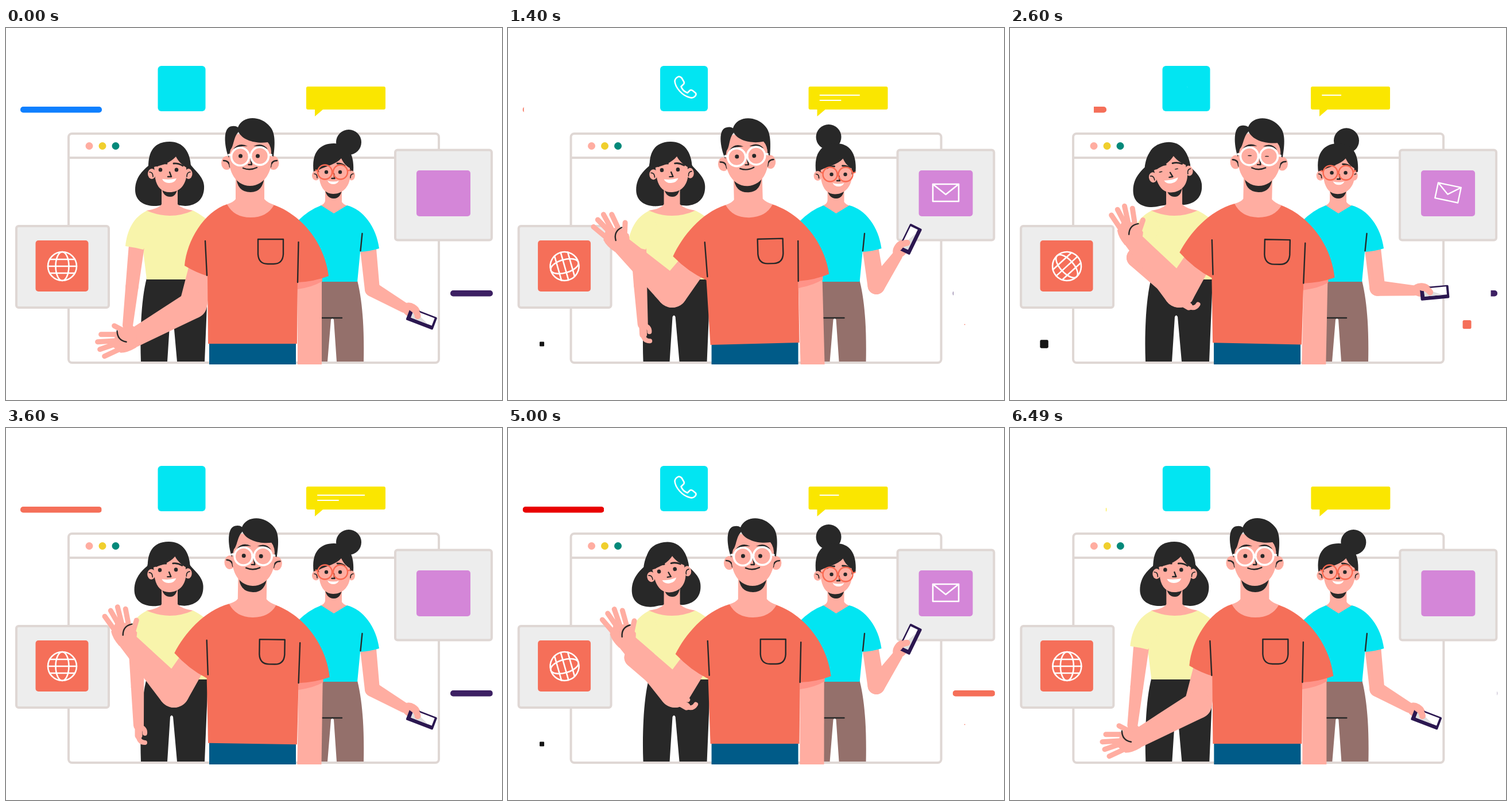
Write an HTML page that moves like this. It is 864 px wide and 648 px high and loops after 6690 ms.

```html
<!DOCTYPE html>
<html lang="en">
<head>
<meta charset="utf-8">
<title>Team greeting</title>
<style>
html, body { margin: 0; width: 100%; height: 100%; overflow: hidden; background: #fff; }
svg { display: block; width: 100vw; height: 100vh; }
.skin { fill: #ffada1; }
.dark { fill: #282828; }
.coral { fill: #f56f59; }
.cyan { fill: #02e5f2; }
.lemon { fill: #f8f4ab; }
.brown { fill: #94706b; }
.frame { stroke: #dfd7d4; stroke-width: 4; }
.ink, .white, .finger { fill: none; stroke-linecap: round; stroke-linejoin: round; }
.ink { stroke: #282828; stroke-width: 2.4; }
.fine { stroke-width: 1.7; }
.brow { stroke-width: 2.8; }
.white { stroke: #fff; stroke-width: 2.6; }
.finger { stroke: #ffada1; stroke-width: 9; }
</style>
</head>
<body>
<svg viewBox="0 0 864 648" preserveAspectRatio="xMidYMid meet">
<defs>
  <clipPath id="floor"><rect width="864" height="586"/></clipPath>
  <clipPath id="wipeL"><rect id="wipeLBox" y="130" height="24"/></clipPath>
  <clipPath id="wipeR"><rect id="wipeRBox" y="450" height="24"/></clipPath>
</defs>
<g id="scene">
  <!-- browser window and floating cards -->
  <rect class="frame" x="109" y="184" width="645" height="399" rx="6" fill="#fff"/>
  <path class="frame" d="M109 226H754"/>
  <circle cx="145" cy="205.5" r="6.5" fill="#ffada1"/>
  <circle cx="168" cy="205.5" r="6.5" fill="#f0cf2d"/>
  <circle cx="191" cy="205.5" r="6.5" fill="#02897a"/>

  <rect class="frame" x="18" y="345" width="161" height="142" rx="4" fill="#ededed"/>
  <rect class="coral" x="51.5" y="370" width="92" height="89" rx="5"/>
  <g id="globe" class="white">
    <circle r="25"/><ellipse rx="11.5" ry="25"/>
    <path d="M-25 0H25M-22-12H22M-22 12H22"/>
  </g>

  <rect class="frame" x="678" y="212.5" width="168" height="157" rx="4" fill="#ededed"/>
  <rect x="715" y="248" width="94" height="80" rx="5" fill="#d486d8"/>
  <path id="mail" class="white" d="M-22.5-15H22.5V15H-22.5ZM-22.5-15L0 3L22.5-15"/>

  <rect class="cyan" x="264.5" y="66" width="83" height="79" rx="6"/>
  <path id="call" class="white" d="M-14-17Q-10-20-6-16L-2-9Q-1-6-4-4L-7-1C-5 5-1 8 4 10L8 6Q10 4 13 6L18 10Q20 12 18 15Q14 20 8 18C-5 15-17 1-18-10Q-18-14-14-17Z"/>

  <path fill="#fae600" d="M526 102H658Q661 102 661 105V139Q661 142 658 142H552L538 154V142H526Q523 142 523 139V105Q523 102 526 102Z"/>
  <path id="line1" class="white" style="stroke-width:2"/>
  <path id="line2" class="white" style="stroke-width:2"/>

  <g clip-path="url(#wipeL)"><rect id="barL" x="25" y="137" width="142" height="10.5" rx="5"/></g>
  <g clip-path="url(#wipeR)"><rect id="barR" x="774" y="457" width="74" height="10.5" rx="5"/></g>
  <rect id="boxL" fill="#141414"/>
  <rect id="boxR" class="coral"/>

  <!-- woman on the right -->
  <circle id="bun" class="dark" r="22"/>
  <path class="skin" d="M556 278H585V303Q588 308 596 310L571 325L547 310Q556 306 556 300Z"/>
  <path class="dark" d="M555 277Q557 297 571 297Q584 297 586 277Z"/>
  <path class="dark" d="M536 252C531 215 548 201 571 201C593 201 607 216 605 250L599 255H546Z"/>
  <g id="headR">
    <ellipse class="skin" cx="540" cy="257" rx="7" ry="8.5"/>
    <path class="ink fine" d="M537 254Q542 254 542 261"/>
    <g id="earR">
      <ellipse class="skin" cx="602" cy="257" rx="6" ry="8.5"/>
      <path class="ink fine" d="M605 254Q600 254 600 261"/>
    </g>
    <path class="skin" d="M545 247L546 264C549 281 558 289 570 289C585 289 597 278 599 262V244C592 240 587 234 584 227C574 238 559 240 545 247Z"/>
    <g id="faceR">
      <path class="ink brow" d="M550 240Q556 236 563 237M577 236Q585 236 590 240"/>
      <circle class="dark" cx="558" cy="251" r="3.2"/><circle class="dark" cx="582" cy="251" r="3.2"/>
      <path class="ink" d="M571 254L572.5 262H567.5"/>
      <path fill="#fff" d="M560 266Q571 269 580 266Q577 272 570 272Q563 272 560 266Z"/>
      <path fill="none" stroke="#fa6a52" stroke-width="2.4" d="M543 251a12.5 12.5 0 1 0 25 0a12.5 12.5 0 1 0-25 0M570 251a12.5 12.5 0 1 0 25 0a12.5 12.5 0 1 0-25 0M568 249H570M595 249L600 247M543 249L539 247"/>
    </g>
  </g>
  <path class="brown" d="M530 440H612C622 480 624 530 623 581H576L571 508Q568.5 503 566 508L560 581H530Z"/>
  <path class="ink" d="M540 505H585"/>
  <path id="upperR" class="skin"/><path id="foreR" class="skin"/>
  <g id="handR">
    <ellipse class="skin" cx="13" cy="-2" rx="17" ry="12"/>
    <g transform="translate(36 1.5) rotate(-9)">
      <rect x="-25" y="-11.5" width="50" height="23" rx="2" fill="#2b1750"/>
      <path fill="#fff" d="M-18-9H21V5H-18Z"/><path fill="#dedede" d="M-18-9L14 5H-18Z"/>
    </g>
    <path class="finger" style="stroke-width:11" d="M13-6Q23-6 28 1"/>
  </g>
  <path class="cyan" d="M549 309L571 323L594 309C622 316 645 346 650 384Q634 389 617 390L612 442H500V345Q522 319 549 309Z"/>
  <path class="ink" d="M620.5 358L617.5 388"/>

  <!-- woman on the left -->
  <path id="hairL" class="dark" d="M285 205C258 205 252 222 248 240C236 250 225 262 225 282C225 302 242 311 262 310Q285 306 312 310C335 309 346 295 345 275C344 258 327 247 321 237C318 216 306 205 285 205Z"/>
  <path class="skin" d="M271 276H299V307Q306 315 326 318Q285 340 244 318Q266 315 271 307Z"/>
  <path class="dark" d="M271 277Q273 294 286 294Q297 294 299 277Z"/>
  <g id="headL">
    <path class="dark" d="M285 198C258 198 247 215 248 245L259 262H314L322 245C322 215 308 198 285 198Z"/>
    <ellipse class="skin" cx="254" cy="254" rx="7" ry="9"/><ellipse class="skin" cx="318" cy="254" rx="6.5" ry="9"/>
    <path class="ink fine" d="M250 251Q256 251 256 259M321 251Q315 251 315 259"/>
    <path class="skin" d="M258 242L260 262C263 278 272 286 285 286C301 286 311 276 314 260V243C307 239 300 232 296 224C286 235 272 239 258 242Z"/>
    <path class="ink brow" d="M263 240Q271 235 280 236M292 236Q300 235 308 240"/>
    <ellipse class="dark eyeL" cx="269" cy="247" rx="3.3"/><ellipse class="dark eyeL" cx="297" cy="247" rx="3.3"/>
    <path class="ink" d="M285 251L288 259H282"/>
    <path fill="#fff" d="M272 263Q285 265 297 262Q294 270 284 270Q275 270 272 263Z"/>
  </g>
  <path class="dark" d="M245 436H352L346 581H298L291 503Q288.5 498 286 503L281 581H235C233 530 236 470 245 436Z"/>
  <path class="lemon" d="M245 318Q285 336 326 318Q346 328 362 345V438H245L238 380Z"/>
  <path id="upperL" class="skin"/><path id="foreL" class="skin"/>
  <g id="handL">
    <path class="finger" style="stroke-width:13" d="M0-2V18"/>
    <path class="finger" style="stroke-width:8" d="M-1 18Q1 30 11 30M3 2Q12 6 11 14"/>
  </g>
  <path class="lemon" d="M246 318C222 329 211 352 208 380Q223 382 239 386L262 350Z"/>

  <!-- man in front -->
  <g clip-path="url(#floor)">
    <path id="upperM" class="skin"/><path id="foreM" class="skin"/>
    <g id="handM">
      <path class="skin" d="M-29-11L-10-20Q8-16 8-4L7 15Q-8 24-20 24L-33 14Z"/>
      <path class="finger" d="M-31-23L-12-13M-54-8L-26-8M-60 5L-28 3M-56 18L-24 7M-48 30L-18 16"/>
      <path class="ink" d="M-26-14Q-26 2-10 5"/>
    </g>
    <path fill="#005b88" d="M354 546H505V586H354Z"/>
    <g id="man">
      <path class="skin" d="M508 430H550V605H508Z"/>
      <path fill="#ff9388" d="M508 440L551 432V441Q535 451 508 455Z"/>
      <path id="shirt" class="coral"/>
      <path class="skin" d="M400 262H450V298Q455 304 467 308Q455 330 426 330Q397 330 385 307Q397 303 400 298Z"/>
      <path class="ink" d="M439 368H483V394Q482 411 466 411H456Q440 411 439 394ZM347 371L350 431M509.5 373L508 443"/>
      <g id="headM">
        <path class="dark" d="M401 258Q402 286 426 286Q448 286 450 258Z"/>
        <ellipse class="skin" cx="384.5" cy="235" rx="9.5" ry="12"/><ellipse class="skin" cx="466" cy="235" rx="9.5" ry="12"/>
        <path class="ink" d="M379 231Q389 231 390 242M472 231Q462 231 461 242"/>
        <path class="skin" d="M389 185V236C392 262 408 275 425 275C442 275 459 262 462 236V185Z"/>
        <path class="dark" d="M388 226C380 205 377 172 394 171Q400 170 404 173C412 152 444 152 460 172C469 182 469 200 466 224L462 222Q463 207 456 199C436 202 412 196 405 181C396 190 397 206 391 212Z"/>
        <path class="dark" d="M396 211Q406 198 421 206Q408 205 396 211ZM431 206Q446 198 456 211Q445 205 431 206Z"/>
        <ellipse class="dark eyeM" cx="408.5" cy="223" rx="3.5"/><ellipse class="dark eyeM" cx="438.5" cy="223" rx="3.5"/>
        <path class="ink" d="M426 226L428 238H422.5M413 244Q425 249 437 243"/>
        <path class="white" style="stroke-width:3.6" d="M392.5 224a15.5 15.5 0 1 0 31 0a15.5 15.5 0 1 0-31 0M426.5 223a15.5 15.5 0 1 0 31 0a15.5 15.5 0 1 0-31 0M423 222H427M392 221H388M458 221H462"/>
      </g>
    </g>
  </g>
</g>
</svg>
<script>
const LOOP = 6690, CYCLE = 18, RAD = Math.PI / 180;
const $ = id => document.getElementById(id);
const set = (id, attrs) => { for (const k in attrs) $(id).setAttribute(k, attrs[k]); };
const move = (id, value) => set(id, { transform: value });
const mix = (a, b, k) => a + (b - a) * k;
const mixPt = (a, b, k) => a.map((v, i) => mix(v, b[i], k));

const clamp = k => Math.min(1, Math.max(0, k));
const easeOut = k => 1 - (1 - clamp(k)) ** 2;
// Smooth rise from 0 to 1 between a and b.
const ramp = (t, a, b) => (1 - Math.cos(Math.PI * clamp((t - a) / (b - a)))) / 2;
// Rise between a and b, fall between c and d.
const pulse = (t, a, b, c, d) => ramp(t, a, b) - ramp(t, c, d);

// Outline around two circles given as [x, y, r].
function limb(id, a, b) {
  const th = Math.atan2(b[1] - a[1], b[0] - a[0]);
  const k = Math.acos((a[2] - b[2]) / Math.hypot(b[0] - a[0], b[1] - a[1]));
  const at = (c, ang) => `${c[0] + c[2] * Math.cos(ang)} ${c[1] + c[2] * Math.sin(ang)}`;
  const arc = (c, big, ang) => `A${c[2]} ${c[2]} 0 ${big ? 1 : 0} 0 ${at(c, ang)}`;
  set(id, { d: `M${at(a, th + k)}L${at(b, th + k)}${arc(b, a[2] < b[2], th - k)}L${at(a, th - k)}${arc(a, a[2] > b[2], th + k)}Z` });
}

// Draws upper arm and forearm, then puts the hand on the wrist.
function arm(side, shoulder, elbow, wrist, turn) {
  limb('upper' + side, shoulder, elbow);
  limb('fore' + side, elbow, wrist);
  move('hand' + side, `translate(${wrist[0]} ${wrist[1]}) rotate(${turn})`);
}

const reach = (p, deg, len, r) => [p[0] + len * Math.cos(deg * RAD), p[1] + len * Math.sin(deg * RAD), r];

function blink(name, shut) {
  document.querySelectorAll('.' + name).forEach(e => e.setAttribute('ry', shut ? 0.8 : 3.5));
}

function square(id, x, y, size) {
  set(id, { x: x - size / 2, y: y - size / 2, width: size, height: size, rx: size / 6 });
}

const CORAL = '#f56f59', PLUM = '#3d2063';
const COLORS_L = ['#0f80ff', CORAL, CORAL, '#e90000', '#fae600'];

// Every seven steps a bar wipes in and out again; the first one is already in.
function drawBars(n) {
  const turn = Math.min(4, Math.floor(n / 7)), p = n - turn * 7;
  const head = turn ? easeOut((p + 0.03) / 4.3) : 1;
  const tail = easeOut((p - 4) / 3.3);
  const wipe = (id, x, w) => set(id, { x: x + w * tail, width: w * Math.max(0, head - tail) });
  wipe('wipeLBox', 25, 142);
  wipe('wipeRBox', 774, 74);
  set('barL', { fill: COLORS_L[turn] });
  set('barR', { fill: turn === 3 ? CORAL : PLUM });
}

function drawIcons(n, p) {
  move('globe', `translate(98 415) rotate(${180 * p / (CYCLE - 1)})`);
  move('mail', `translate(762 287) rotate(${12 * Math.max(0, p - 12)}) scale(${pulse(p, 2, 5, 12, 17)})`);
  move('call', `translate(308 103) scale(${pulse(p, 2, 5, 9, 13.5)})`);

  const q = n % 12;
  const line = (id, y, len) => set(id, { d: len > 1 ? `M543 ${y}h${len - 1}` : '' });
  line('line1', 117, 84 * (easeOut(q / 4.5) - ramp(q, 5.5, 11)));
  line('line2', 126, 37 * pulse(q, 2, 5, 8, 11));

  square('boxL', 58.5, 550.5, 16 * pulse(p, 3, 11, 12, 17));
  square('boxR', 795, 516.5, 15 * pulse(p, 5.5, 13, 14, 17));
}

function drawRight(p) {
  const q = pulse(p, 0, 7, 7, 16.6);
  set('bun', { cx: mix(597, 558, q), cy: mix(199, 190, q) });
  move('headR', `translate(${-q} ${q * 0.5})`);
  move('earR', `translate(${-10 * q} 0)`);
  move('faceR', `translate(${6 * q} ${3.5 * q})`);
  const elbow = mixPt([638, 455, 13], [641, 449, 15], q);
  const angle = mix(30, -55, q);
  arm('R', [631, 385, 14], elbow, reach(elbow, angle, 64, 9), angle);
}

function drawLeft(n) {
  const tilt = pulse(n, 4.5, 13, 13, 19.5) + pulse(n, 19, 27, 30, 35);
  move('hairL', `translate(${-11 * tilt} 0) rotate(${-4 * tilt} 285 290)`);
  move('headL', `rotate(${-10.5 * tilt} 285 290)`);
  blink('eyeL', n % 26 === 13);

  const hip = pulse(n, 6, 13, 13, 18) + pulse(n, 20, 25, 30, 35);
  const shoulder = [227, 384, 13.5];
  const hanging = [mix(212, 231, pulse(n, 0, 6, 30, 35)), 518, 9];
  const wrist = mixPt(hanging, [295, 476, 9], hip);
  const elbow = mixPt(mixPt(shoulder, wrist, 0.5), [219, 400, 17], hip);
  arm('L', shoulder, elbow, wrist, -60 * hip);
}

function drawMan(n) {
  const lean = 1.2 * pulse(n, 7, 13, 13, 27) - 1.55 * pulse(n, 0, 7, 7, 13);
  move('man', `rotate(${lean} 430 550)`);
  move('headM', `rotate(${lean * 0.8} 425 290)`);
  blink('eyeM', n % 17 === 13);

  const up = pulse(n, 1, 5, 25.5, 31);
  const pt = (a, b) => mixPt(a, b, up).join(' ');
  set('shirt', { d: `M385 307C${pt([345, 320], [341, 320])} ${pt([315, 370], [308, 360])} ${pt([311, 414], [291, 394])}` +
    `Q${pt([331, 426], [317, 422])} ${pt([351, 432], [348, 437])}L352 550H507L508 443Q536 442 562 432` +
    'C555 375 515 325 466 308Q426 340 385 307Z' });

  const shoulder = mixPt([340, 420, 22], [324, 410, 24], up);
  const elbow = mixPt([326, 482, 24], [290, 460, 27], up);
  elbow[0] += 3 * lean;
  const wrist = reach(elbow, mix(150.7, 226, up) + 2 * lean, 122, 16);
  arm('M', shoulder, elbow, wrist, 74 * up + 6 * lean);
}

// Poses advance in steps, with a short quick run near the end of the loop.
function stepAt(ms) {
  if (ms < 6000) return Math.floor(ms / 200);
  if (ms < 6090) return 30 + Math.floor((ms - 6000) / 30);
  return 33 + Math.floor((ms - 6090) / 200);
}

function draw(ms) {
  const n = stepAt(ms), p = n % CYCLE;
  move('scene', `translate(${p * 0.08} 0)`);
  drawBars(n);
  drawIcons(n, p);
  drawRight(p);
  drawLeft(n);
  drawMan(n);
}

const start = performance.now();
function tick() {
  draw((performance.now() - start) % LOOP);
  requestAnimationFrame(tick);
}
tick();
</script>
</body>
</html>
```
